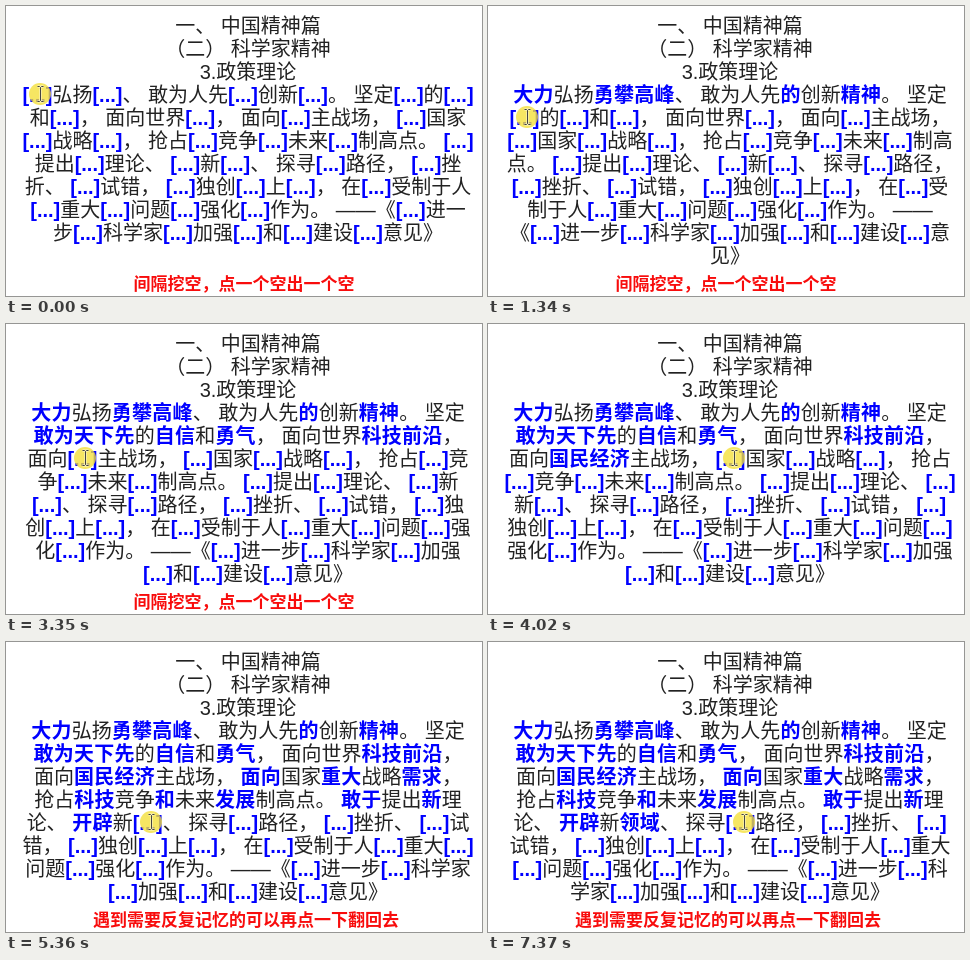
An HTML page that plays this animation: 476 px wide and 290 px high, repeating every 8 s.

```html
<!DOCTYPE html>
<html lang="zh-CN">
<head>
<meta charset="utf-8">
<style>
html, body { margin: 0; width: 476px; height: 290px; overflow: hidden; background: #fff; }
body { position: relative; text-spacing-trim: space-all; }
#page {
  position: absolute; left: 16px; top: 9px; width: 452px;
  font: 300 20px/23px "Liberation Sans", "Noto Sans CJK SC", "Noto Sans CJK", sans-serif;
  text-align: center; color: #222;
}
#page b { font-weight: 700; color: #00f; white-space: nowrap; }
#page .open { letter-spacing: .25px; }
#caption {
  position: absolute; top: 267px; width: 400px;
  font: 700 17px/20px "Noto Sans CJK SC", "Noto Sans CJK", sans-serif;
  text-align: center; color: #f80c0c;
}
#cursor { position: absolute; left: -12px; top: -12px; }
</style>
</head>
<body>
<div id="page">
  <div>一、 中国精神篇</div>
  <div>（二） 科学家精神</div>
  <div>3.政策理论</div>
  <div id="cloze"></div>
</div>
<div id="caption"></div>
<svg id="cursor" width="24" height="24" fill="none">
  <defs><path id="beam" d="M9.5 4.5h2l1 1 1-1h2M12.5 5.5v13M9.5 19.5h2l1-1 1 1h2"/></defs>
  <circle cx="12" cy="12" r="11" fill="#f3df37" fill-opacity=".78"/>
  <use href="#beam" stroke="#fff" stroke-opacity=".5" stroke-width="2.5"/>
  <use href="#beam" stroke="#444"/>
</svg>
<script>
const $ = id => document.getElementById(id);

// Braces mark the gaps; the ones never opened stay empty.
const text = "{大力}弘扬{勇攀高峰}、 敢为人先{的}创新{精神}。 坚定{敢为天下先}的{自信}和{勇气}， " +
  "面向世界{科技前沿}， 面向{国民经济}主战场， {面向}国家{重大}战略{需求}， " +
  "抢占{科技}竞争{和}未来{发展}制高点。 {敢于}提出{新}理论、 {开辟}新{领域}、 " +
  "探寻{}路径， {}挫折、 {}试错， {}独创{}上{}， 在{}受制于人{}重大{}问题{}强化{}作为。 " +
  "——《{}进一步{}科学家{}加强{}和{}建设{}意见》";

// How many gaps are open at each step; one is flipped back near the end.
const opened = [0, 1, 4, 6, 7, 8, 9, 11, 18, 19, 18, 19];

function setCaption(words, left) {
  $("caption").textContent = words;
  $("caption").style.left = left + "px";
}

function show(step) {
  const count = opened[step];
  let gap = 0;
  $("cloze").innerHTML = text.replace(/{(.*?)}/g, (_, word) =>
    gap++ < count ? `<b class="open">${word}</b>` : "<b>[...]</b>");

  // The pointer rests on the gap that the next click will flip.
  const aim = Math.min(count, opened[step + 1] ?? count);
  const box = $("cloze").querySelectorAll("b")[aim].getBoundingClientRect();
  const x = box.left + box.width / 2 + 3, y = box.top + box.height / 2 - 1.5;
  $("cursor").style.transform = `translate(${Math.round(x)}px, ${Math.round(y)}px)`;

  if (step < 6) setCaption("间隔挖空，点一个空出一个空", 38);
  else if (step < 8) setCaption("", 0);
  else setCaption("遇到需要反复记忆的可以再点一下翻回去", 40);
}

let current = -1;
function tick() {
  const step = Math.floor(performance.now() % 8000 / 670);
  if (step !== current) show(current = step);
  requestAnimationFrame(tick);
}
tick();
</script>
</body>
</html>
```
